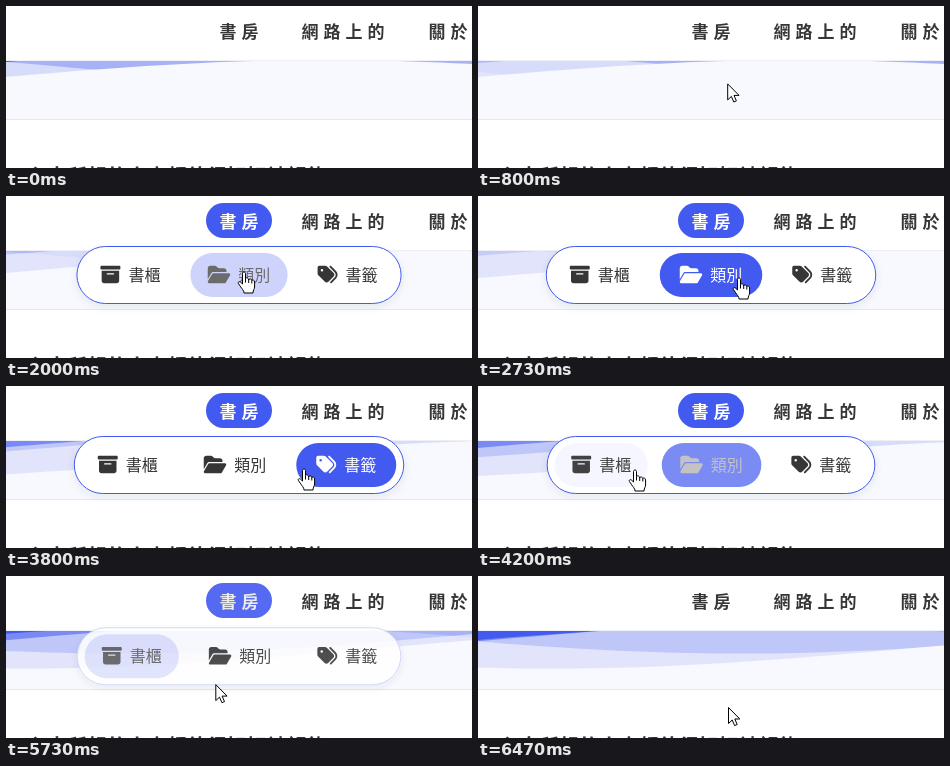
Write an HTML page that moves like this. It is 466 px wide and 162 px high and loops after 6.54 s.

```html
<!DOCTYPE html>
<html lang="zh-Hant">
<head>
<meta charset="utf-8">
<style>
html, body { margin: 0; width: 100%; height: 100%; overflow: hidden; background: #fff; }
svg { display: block; width: 466px; height: 162px; }
text { font-family: "Noto Sans CJK TC", "Noto Sans CJK JP", "Noto Sans CJK", sans-serif; font-size: 16px; }
.nav { font-size: 17px; font-weight: 700; letter-spacing: 5px; fill: #363636; }
.title { font-size: 20px; font-weight: 700; fill: #363636; }
</style>
</head>
<body>
<svg viewBox="0 0 466 162">
  <defs>
    <clipPath id="band"><rect y="55" width="466" height="58"/></clipPath>
    <filter id="soft" x="-10%" y="-40%" width="120%" height="190%">
      <feDropShadow dx="0" dy="3" stdDeviation="4" flood-color="#2c2d30" flood-opacity=".08"/>
    </filter>
  </defs>
  <rect width="466" height="162" fill="#fff"/>
  <g id="waves" clip-path="url(#band)"><rect y="55" width="466" height="58" fill="#425aef"/></g>
  <path d="M0 113.5H466" stroke="#e6e8f0"/>
  <path d="M0 54.5H466" stroke="#eef0f6"/>
  <text class="title" x="21" y="178">心中所想的小事都值得好好被記錄</text>
  <rect id="pill" x="200" y="7" width="66" height="35" rx="17.5" fill="#425aef"/>
  <text class="nav" id="study" x="213.5" y="32">書房</text>
  <text class="nav" x="295.5" y="32">網路上的</text>
  <text class="nav" x="422.5" y="32">關於</text>
  <g id="menu"><rect id="panel" y="50.5" height="57" rx="28.5" fill="#fff" filter="url(#soft)"/></g>
  <g id="cursor" fill="#fff" stroke="#000" stroke-linejoin="round">
    <path id="arrow" d="M.5 .5V16.5L4.2 13 6.6 18.6 9.2 17.5 6.8 12H11.8Z"/>
    <path id="hand" d="M-1.5 1.5C-1.5-.5 1.5-.5 1.5 1.5V6.5C2 5.3 4.5 5.6 4.7 8C5 6.4 7.7 6.6 7.8 8.7C8.4 7.5 10.6 8 10.6 10V15C10.6 17 9 18 9 21H0C0 18.5-2 17-3.3 14.8L-5.6 11.5C-6.4 10-4.6 9-3.4 10.2L-1.5 12ZM1.5 6.5V10.5M4.7 8V11M7.8 8.7V11.5"/>
  </g>
</svg>
<script>
const LOOP = 6540, BLUE = [66, 90, 239], DARK = [54, 54, 54], WHITE = [255, 255, 255];
const $ = id => document.getElementById(id);
const set = (el, attrs) => { for (const k in attrs) el.setAttribute(k, attrs[k]); };
const make = (tag, parent, attrs = {}) => {
  const el = parent.appendChild(document.createElementNS('http://www.w3.org/2000/svg', tag));
  set(el, attrs);
  return el;
};
const clamp = v => Math.max(0, Math.min(1, v));
const smooth = v => { v = clamp(v); return v * v * (3 - 2 * v); };
const mix = (a, b, p) => `rgb(${a.map((v, i) => Math.round(v + (b[i] - v) * p))})`;
// rises at `on`, falls at `off`
const during = (t, on, off, fade = 260) => smooth((t - on) / fade) * (1 - smooth((t - off) / fade));

// pale translucent waves over the blue band
const WAVE_LENGTH = 1386, WAVE_HEIGHT = 19.3;
const waves = [
  { mid: 64.7, trough: -450, speed: 17, delay: 0, alpha: .55 },
  { mid: 69, trough: 295, speed: 106, delay: 0, alpha: .3 },
  { mid: 58.3, trough: 374, speed: 197, delay: 0, alpha: .6 },
  { mid: 73.3, trough: -373, speed: 85, delay: 1200, alpha: 1 }
].map(w => ({ ...w, el: make('path', $('waves'), { fill: '#f8f9fe', 'fill-opacity': w.alpha }) }));

function drawWave(w, t) {
  const trough = w.trough + w.speed * Math.max(0, t - w.delay) / 1000;
  let d = 'M0 114';
  for (let x = 0; x <= 476; x += 14) {
    const y = w.mid + WAVE_HEIGHT * Math.cos(2 * Math.PI * (x - trough) / WAVE_LENGTH);
    d += `L${x} ${y.toFixed(2)}`;
  }
  w.el.setAttribute('d', d + 'V114Z');
}

const items = [
  { label: '書櫃', icon: 20, hover: [[4140, 5560]],
    d: 'M32 32H480c17.7 0 32 14.3 32 32V96c0 17.7-14.3 32-32 32H32C14.3 128 0 113.7 0 96V64C0 46.3 14.3 32 32 32zm0 128H480V416c0 35.3-28.7 64-64 64H96c-35.3 0-64-28.7-64-64V160zm128 80c0 8.8 7.2 16 16 16H336c8.8 0 16-7.2 16-16s-7.2-16-16-16H176c-8.8 0-16 7.2-16 16z' },
  { label: '類別', icon: 22.5, hover: [[1900, 2860], [3850, 4095]],
    d: 'M88.7 223.8L0 375.8V96C0 60.7 28.7 32 64 32H181.5c17 0 33.3 6.7 45.3 18.7l26.5 26.5c12 12 28.3 18.7 45.3 18.7H416c35.3 0 64 28.7 64 64v32H144c-22.8 0-43.8 12.1-55.3 31.8zm27.6 16.1C122.1 230 132.6 224 144 224H544c11.5 0 22 6.1 27.7 16.1s5.7 22.2-.1 32.1l-112 192C453.9 474 443.4 480 432 480H32c-11.5 0-22-6.1-27.7-16.1s-5.7-22.2 .1-32.1l112-192z' },
  { label: '書籤', icon: 20, hover: [[2900, 3940]],
    d: 'M345 39.1L472.8 168.4c52.4 53 52.4 138.2 0 191.2L360.8 472.9c-9.3 9.4-24.5 9.5-33.9 .2s-9.5-24.5-.2-33.9L438.6 325.9c33.9-34.3 33.9-89.4 0-123.7L310.9 72.9c-9.3-9.4-9.2-24.6 .2-33.9s24.6-9.2 33.9 .2zM0 229.5V80C0 53.5 21.5 32 48 32H197.5c17 0 33.3 6.7 45.3 18.7l168 168c25 25 25 65.5 0 90.5L277.3 442.7c-25 25-65.5 25-90.5 0l-168-168C6.7 262.7 0 246.5 0 229.5zM144 144a32 32 0 1 0 -64 0 32 32 0 1 0 64 0z' }
];
for (const item of items) {
  item.pill = make('rect', $('menu'), { y: 57, height: 44, rx: 22, fill: '#425aef' });
  item.glyph = make('path', $('menu'), { d: item.d });
  item.text = make('text', $('menu'), { y: 85 });
  item.text.textContent = item.label;
}

function drawMenu(t) {
  const shown = during(t, 1160, 5660, 320), bordered = during(t, 1800, 5600, 200);
  set($('menu'), { opacity: shown, transform: `translate(0 ${(1 - shown) * 10})` });
  const hovers = items.map(i => Math.max(...i.hover.map(([on, off]) => during(t, on, off))));
  const widths = items.map((item, i) => item.icon + 40 + 2 * (16 + 4 * hovers[i]));
  const total = widths.reduce((a, b) => a + b) + 44;
  const left = 233 - total / 2;
  set($('panel'), { x: left + .5, width: total - 1, stroke: mix(WHITE, BLUE, bordered) });
  let x = left + 8;
  items.forEach((item, i) => {
    const tint = smooth(hovers[i]), start = x + 16 + 4 * hovers[i], fill = mix(DARK, WHITE, tint);
    set(item.pill, { x, width: widths[i], opacity: tint });
    set(item.glyph, { fill, transform: `translate(${start} 68.5) scale(${20 / 512})` });
    set(item.text, { fill, x: start + item.icon + 8 });
    x += widths[i] + 14;
  });
}

// time, x, y of the pointer tip
const path = [
  [330, 262, 168], [730, 250, 82], [1130, 241, 27], [1530, 241, 27], [2000, 238, 76],
  [2400, 250, 80], [2730, 261, 82], [3130, 345, 83], [3500, 340, 83], [3800, 298, 83],
  [4200, 157, 84], [4500, 140, 84], [4800, 142, 84], [5070, 158, 84], [5400, 170, 86], [6070, 250, 131]
];
function drawCursor(t) {
  const next = path.findIndex(p => p[0] > t);
  let [, x, y] = path[path.length - 1];
  if (next >= 0) {
    const b = path[next], a = path[Math.max(0, next - 1)];
    const p = smooth((t - a[0]) / (b[0] - a[0] || 1));
    x = a[1] + (b[1] - a[1]) * p;
    y = a[2] + (b[2] - a[2]) * p;
  }
  const overLink = t > 1040 && t < 5680;
  set($('cursor'), { transform: `translate(${x.toFixed(1)} ${y.toFixed(1)})`, visibility: t < 330 ? 'hidden' : 'visible' });
  $('arrow').style.display = overLink ? 'none' : '';
  $('hand').style.display = overLink ? '' : 'none';
}

function draw(t) {
  waves.forEach(w => drawWave(w, t));
  const active = during(t, 1110, 5680);
  set($('pill'), { opacity: active });
  $('study').style.fill = mix(DARK, WHITE, active);
  drawMenu(t);
  drawCursor(t);
}

const began = performance.now();
function tick() {
  draw((performance.now() - began) % LOOP);
  requestAnimationFrame(tick);
}
tick();
</script>
</body>
</html>
```
